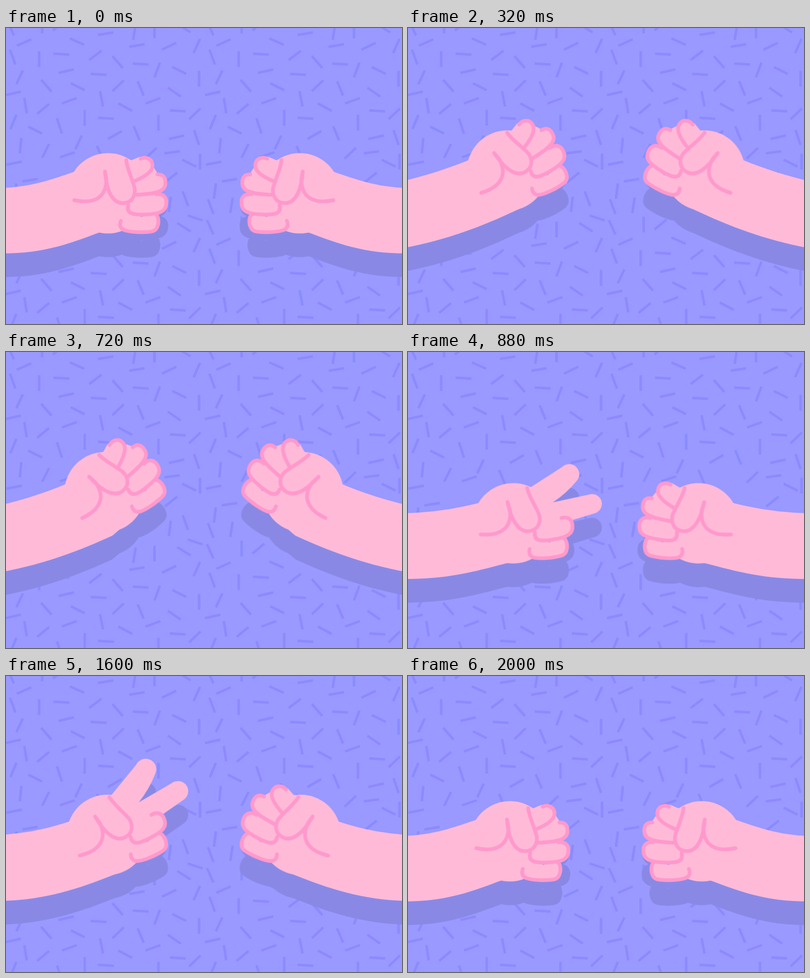
An HTML page without scripts for the animation above (2040 ms loop, 800 px wide and 600 px high).

```html
<!DOCTYPE html>
<html lang="en">
<head>
<meta charset="utf-8">
<title>Hand game</title>
<style>
  html, body { margin: 0; width: 100%; height: 100%; overflow: hidden; background: #99f; }
  svg { display: block; width: 100vw; height: 100vh; }

  .confetti { fill: none; stroke: #8c8aff; stroke-width: 5; }
  .body { fill: #ffbad8; filter: drop-shadow(0 48px 0 #8989e5); }
  .line { stroke: #ff99cc; stroke-width: 7.5; stroke-linecap: round; stroke-linejoin: round; }
  .open { fill: none; }

  .arm, .hand, .curl, .vee, .grow { animation: 2040ms linear infinite; }
  .arm { animation-name: arm; }
  .hand { animation-name: hand; transform-origin: 206px 335px; }
  .curl { animation-name: curl; animation-timing-function: step-end; }
  .vee { animation-name: vee; animation-timing-function: step-end; }
  .grow { animation-name: grow; transform-origin: 262px 312px; }

  .arm, .hand {
    --in: cubic-bezier(.47, 0, .745, .715);
    --out: cubic-bezier(.39, .575, .565, 1);
    --drop: cubic-bezier(.55, .055, .675, .19);
    --back: cubic-bezier(.45, 0, .55, 1);
  }

  /* one wind-up, the throw, a hold, the return */
  @keyframes hand {
    0%, 2% { transform: translate(0, 0) rotate(0deg); animation-timing-function: var(--in); }
    15.69% { transform: translate(-5.4px, -46px) rotate(-29deg); animation-timing-function: var(--out); }
    27.7% { transform: translate(-8px, -82px) rotate(-37deg); animation-timing-function: var(--drop); }
    35.29% { transform: translate(-6.5px, -51px) rotate(-37.5deg); animation-timing-function: var(--out); }
    43.14% { transform: translate(6.7px, 12px) rotate(-7.5deg); animation-timing-function: ease-out; }
    44.2% { transform: translate(6.5px, 14px) rotate(-6.5deg); animation-timing-function: var(--back); }
    50.98%, 82.35% { transform: translate(-1.6px, -13px) rotate(-25.5deg); animation-timing-function: var(--back); }
    98%, 100% { transform: translate(0, 0) rotate(0deg); }
  }
  @keyframes arm {
    0%, 2% { d: path("M-9 324C50 323 95 306 142 290L205 415L190 414C130 436 80 457 -9 457Z"); animation-timing-function: var(--in); }
    15.69% { d: path("M-9 310C40 298 80 285 122 268L232 363L220 369C150 402 80 429 -9 446Z"); animation-timing-function: var(--out); }
    27.7% { d: path("M-9 299C40 285 80 262 118 237L229 328L214 340C150 378 80 414 -9 435Z"); animation-timing-function: var(--drop); }
    35.29% { d: path("M-9 310C40 298 80 285 120 268L229 360L215 372C150 402 80 429 -9 446Z"); animation-timing-function: var(--out); }
    43.14% { d: path("M-9 327C50 325 95 318 143 306L212 427L199 428C130 446 80 460 -9 460Z"); animation-timing-function: ease-out; }
    44.2% { d: path("M-9 328C50 328 95 318 143 307L211 429L198 430C130 449 80 462 -9 462Z"); animation-timing-function: var(--back); }
    50.98%, 82.35% { d: path("M-9 322C45 318 85 309 128 295L229 398L215 404C150 430 80 454 -9 456Z"); animation-timing-function: var(--back); }
    98%, 100% { d: path("M-9 324C50 323 95 306 142 290L205 415L190 414C130 436 80 457 -9 457Z"); }
  }
  @keyframes curl {
    0%, 91% { visibility: visible; }
    38.5% { visibility: hidden; }
  }
  @keyframes vee {
    0%, 91% { visibility: hidden; }
    38.5% { visibility: visible; }
  }
  @keyframes grow {
    0%, 38.5% { transform: scale(.5); animation-timing-function: ease-out; }
    43.14% { transform: scale(.96); animation-timing-function: ease-out; }
    49%, 82.35% { transform: scale(1); animation-timing-function: ease-in; }
    91%, 100% { transform: scale(.5); }
  }
</style>
</head>
<body>
<svg viewBox="0 0 800 600" preserveAspectRatio="none">
  <defs>
    <!-- one tile of sprinkles, a path per direction -->
    <g id="tile">
      <path d="M96 52l32 2M256 72l32 2M171 93l32 2M186 182l32 2M331 167l32 2"/>
      <path d="M186 14l31-5M249 38l31-5M106 91l31-7M-1 136l31-7M1 277l31-6M320 254l31-4M33 311l31-5M329 225l31-7"/>
      <path d="M22 36l29-13M315 44l29-14M113 153l30-11M282 153l30-11M206 225l28-16M109 262l30-10"/>
      <path d="M168 65l25-19M63 174l24-20M215 128l23-22M370 185l23-22M281 265l23-22M321 313l25-20M95 5l24-20"/>
      <path d="M379 51l13-29M300 100l11-30M21 114l13-28M9 205l12-29M140 246l13-28M73 263l14-28"/>
      <path d="M67 47v32M300-11v32M390 87v32M159 166v32M308 176v32M392 255v32M73-21v32"/>
      <path d="M333 342l-4 31M55 344l-5 31M21 315l-4 31M262-7l-5 31M31 223l-3 31"/>
      <path d="M37 142l5 31M190 128l6 31"/>
      <path d="M8 44l11 30M103 183l10 31M266 108l12 29M258 199l12 29M380 207l10 30M357 331l11 30M5 347l11 30M184 239l12 29M3-14l13 29"/>
      <path d="M215 57l21 24M71 105l21 24"/>
      <path d="M129 21l29 13M336 79l28 14M131 112l28 14M45 200l28 14M227 153l28 15M327 121l26 18M356 267l28 14M367 380l30 10M346-8l27 17"/>
    </g>

    <circle id="palm" cx="206" cy="335" r="81.500"/>

    <!-- index and middle finger folded in -->
    <g id="folded">
      <path d="M240 300L251 269L270 261L290 268L298 282L306 294L316 325L306 345L250 350Z"/>
      <path class="line open" d="M272 265C282 260 296 265 296 279C296 293 275 304 258 311"/>
      <path class="line" d="M306 297C318 296 323 304 322 316C321 331 305 336 264 338"/>
    </g>

    <!-- ring finger, little finger, thumb -->
    <g id="front" class="line">
      <path d="M302 377C309 382 309 395 306 402C303 411 297 413 285 413.500C268 414.500 250 413 240 410C230 406 229 399 232 391"/>
      <path d="M304 337C318 335 325 344 324 355C323 372 311 377 282 378C256 379 242 376 247 359"/>
      <path class="open" d="M138 349C180 358 202 342 203 308L200 291C203 330 215 355 236 355C254 355 262 340 260 325C257 310 244 285 243 268"/>
    </g>
  </defs>

  <rect width="800" height="600" fill="#99f"/>
  <g class="confetti">
    <use href="#tile"/>
    <use href="#tile" x="403"/>
    <use href="#tile" y="403.500"/>
    <use href="#tile" x="403" y="403.500"/>
  </g>

  <g class="body">
    <path class="arm" d="M-9 324C50 323 95 306 142 290L205 415L190 414C130 436 80 457 -9 457Z"/>
    <g class="hand">
      <use href="#palm"/>
      <g class="curl"><use href="#folded"/></g>
      <g class="vee">
        <g class="grow">
          <path d="M240 300L246 267L320 232A20.500 20.500 0 0 1 347 265Q324 287 292 303L260 325Z"/>
          <path d="M270 300L292 303L369 296.500A20.500 20.500 0 0 1 377.500 337L324 346L270 345Z"/>
        </g>
      </g>
      <use href="#front"/>
    </g>
  </g>

  <g transform="translate(799.500 0) scale(-1 1)">
    <g class="body">
      <path class="arm" d="M-9 324C50 323 95 306 142 290L205 415L190 414C130 436 80 457 -9 457Z"/>
      <g class="hand">
        <use href="#palm"/>
        <use href="#folded"/>
        <use href="#front"/>
      </g>
    </g>
  </g>
</svg>
</body>
</html>
```
